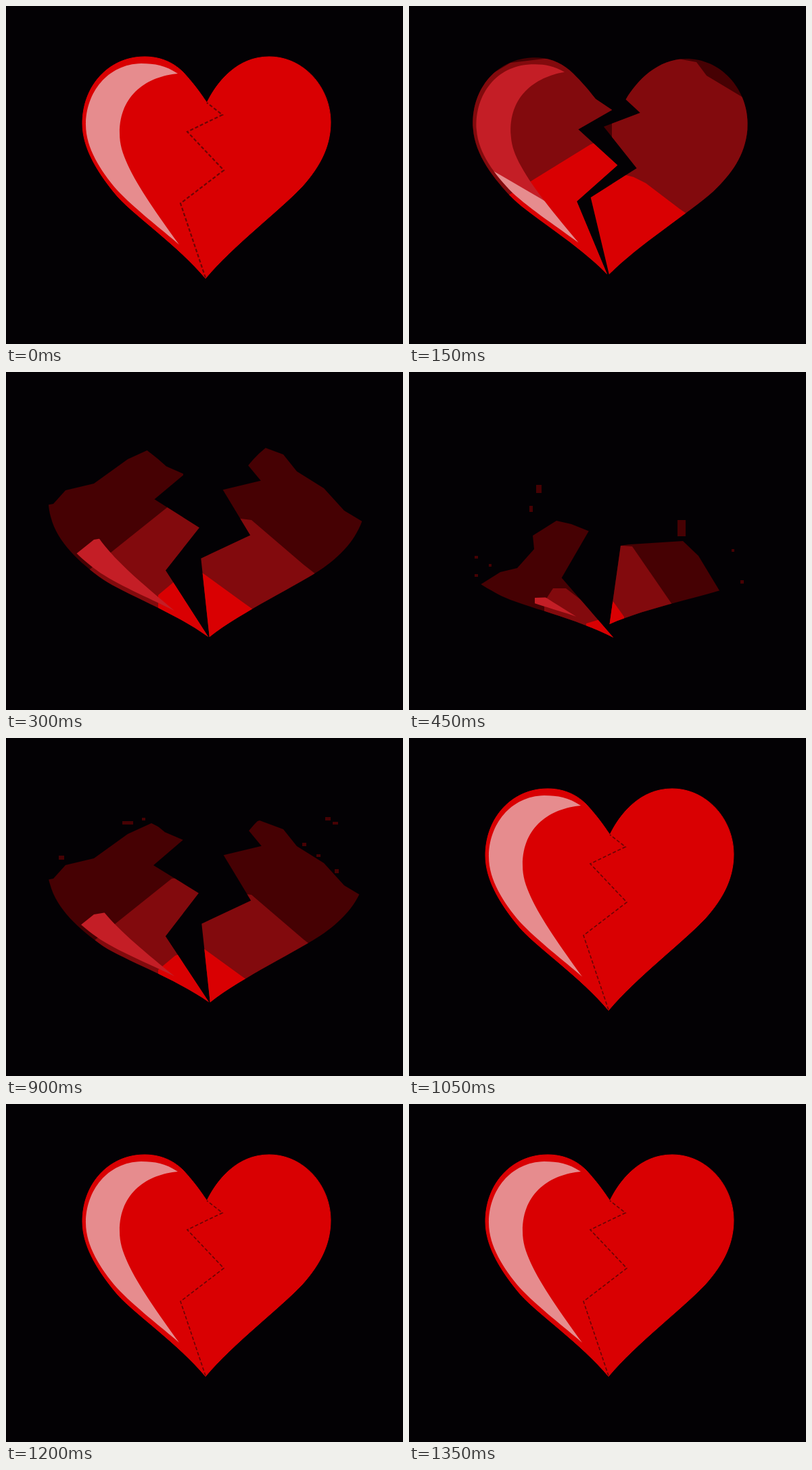
Write an HTML page with a canvas that moves like this. It is 587x500 px and loops after 1.5 s.

```html
<!DOCTYPE html>
<html lang="en">
<head>
<meta charset="utf-8">
<title>Breaking heart</title>
<style>
html, body { margin: 0; width: 100%; height: 100%; overflow: hidden; background: #030104; }
canvas { display: block; }
</style>
</head>
<body>
<canvas id="stage" width="587" height="500"></canvas>
<script>
const ctx = document.getElementById('stage').getContext('2d');
const BLACK = '#030104', DARK = '#460103', MID = '#820a0d', RED = '#d90002',
      ROSE = '#c41e26', PINK = '#e68c8e';
const LOOP = 1500, TIP = [295, 402];

const crack = 'L258 292 L322 243 L268 186 L320 161 L297 143';
const halves = {
  left: new Path2D('M297 143 C285 125 275 112 262 98 C246 82 226 75 205 75 C152 75 113 118 113 174' +
    ' C113 212 138 250 165 282 C190 310 255 355 295 403 ' + crack + 'Z'),
  right: new Path2D('M297 143 C312 112 342 75 389 75 C440 75 480 120 480 172' +
    ' C480 210 462 240 438 267 C405 302 335 355 295 403 ' + crack + 'Z')
};
const crackLine = new Path2D('M295 402 ' + crack);
const shine = new Path2D('M254 100 C236 88 220 85 200 85 C150 86 118 128 118 176' +
  ' C118 210 140 244 164 272 C190 300 230 330 256 353 C225 310 195 268 180 235' +
  ' C172 217 168 205 168 188 C168 130 210 104 254 100Z');

const ALL = '0,0 587,0';

// Each band colours everything below its line, in stage coordinates.
const openBands = {
  left: [[DARK, '50,212 70,208 88,188 130,178 180,142 215,126 262,150'],
         [MID, '90,332 165,272 245,208 310,200'],
         [RED, '225,343 250,322 310,300']],
  shine: [[ROSE, '100,285 130,261 148,258 310,350']],
  right: [[DARK, '300,165 365,125 375,122 410,135 430,160 470,185 500,218 530,236'],
          [MID, '270,220 363,232 440,298 500,345'],
          [RED, '270,297 293,312 348,352 390,382']]
};

const poses = [
  { at: 0, whole: 2.2 },
  { at: 150, left: [293, 396, -4.2], right: [296, 396, 5], bands: {
      left: [[DARK, ALL], [MID, '90,120 150,84 200,78 320,78'], [RED, '100,309 187,255 268,205 330,180']],
      shine: [[ROSE, ALL], [PINK, '90,225 135,250 195,285 260,325']],
      right: [[DARK, ALL], [MID, '300,60 425,83 440,103 490,133 530,157'],
              [RED, '240,230 332,253 350,262 400,300 450,335']] } },
  { at: 300, left: [299, 391, -14.3], right: [301, 391, 12.3], bands: openBands, lift: 13 },
  { at: 450, left: [302, 392, -22.5], right: [297, 372, 26.5], bands: {
      left: [[DARK, '100,318 135,296 160,290 185,262 183,242 218,220 240,225 270,237'],
             [MID, '200,340 213,320 232,320 310,380'], [RED, '262,372 282,366 302,385']],
      shine: [[ROSE, '186,334 310,330']],
      right: [[DARK, '280,258 405,250 428,272 460,325'],
              [MID, '290,255 330,258 383,335 400,360'], [RED, '290,330 303,341 318,362']] },
    specks: '188,167,8,12 178,198,5,9 397,219,12,24 97,272,5,4 97,299,5,4 118,284,4,4 490,308,5,5 477,262,4,4' },
  { at: 750, left: [300, 390, -15], right: [302, 390, 12.3], bands: openBands,
    specks: '172,123,16,5 201,118,5,4 78,174,8,6 472,117,8,5 483,124,8,4 438,155,6,5 459,172,6,4 486,194,6,6' },
  { at: 1050, whole: 1.7 }
];

const parse = text => text.split(' ').map(item => item.split(',').map(Number));

function place(x, y, degrees) {
  ctx.translate(x, y);
  ctx.rotate(degrees * Math.PI / 180);
  ctx.translate(-TIP[0], -TIP[1]);
}

function fillBands(path, spot, bands, lift = 0) {
  ctx.save();
  place(...spot);
  ctx.clip(path);
  ctx.setTransform(1, 0, 0, 1, 0, -lift);
  for (const [color, line] of bands) {
    const points = parse(line);
    ctx.beginPath();
    points.forEach(([x, y]) => ctx.lineTo(x, y));
    ctx.lineTo(points[points.length - 1][0], 520);
    ctx.lineTo(points[0][0], 520);
    ctx.fillStyle = color;
    ctx.fill();
  }
  ctx.restore();
}

function drawWhole(lineWidth) {
  for (const half of Object.values(halves)) {
    ctx.fillStyle = ctx.strokeStyle = RED;
    ctx.lineWidth = 1;
    ctx.fill(half);
    ctx.stroke(half);
  }
  ctx.fillStyle = PINK;
  ctx.fill(shine);
  ctx.strokeStyle = '#6c0505';
  ctx.lineWidth = lineWidth;
  ctx.setLineDash([5, 3]);
  ctx.stroke(crackLine);
  ctx.setLineDash([]);
}

function drawBroken({ left, right, bands, lift, specks }) {
  fillBands(halves.left, left, bands.left, lift);
  fillBands(shine, left, bands.shine, lift);
  fillBands(halves.right, right, bands.right, lift);
  ctx.fillStyle = DARK;
  if (specks) parse(specks).forEach(box => ctx.fillRect(...box));
}

function draw(now) {
  const time = now % LOOP;
  const pose = poses.filter(p => p.at <= time).pop();
  ctx.fillStyle = BLACK;
  ctx.fillRect(0, 0, 587, 500);
  if (pose.whole) drawWhole(pose.whole);
  else drawBroken(pose);
}

const start = performance.now();
function tick() {
  draw(performance.now() - start);
  requestAnimationFrame(tick);
}
tick();
</script>
</body>
</html>
```
